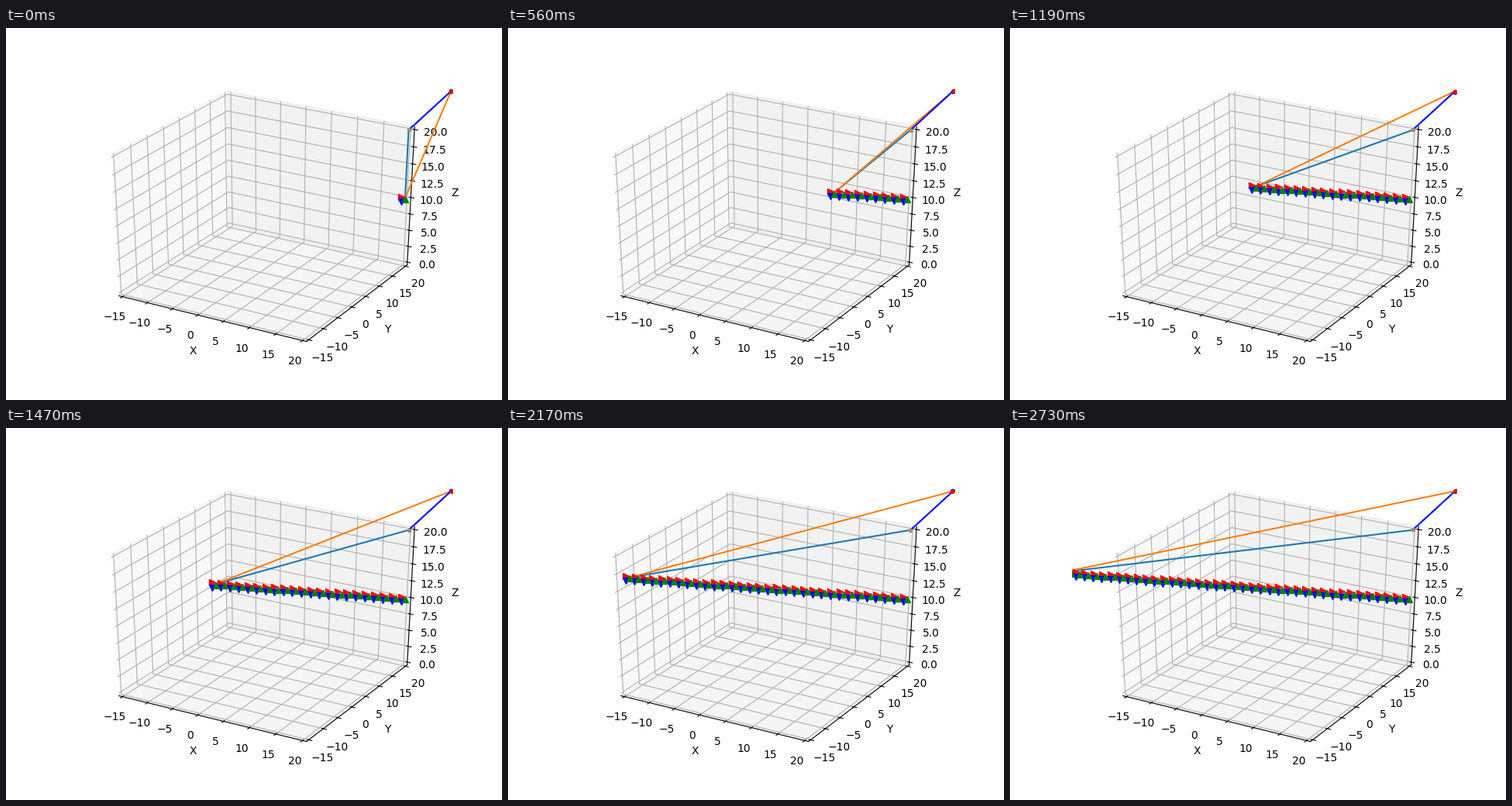
A matplotlib script that plays this animation: 640x480 px, repeating every 2800 ms.

```python
import numpy as np
import matplotlib.pyplot as plt
from matplotlib.animation import FuncAnimation

FRAMES = 40
START = np.array([20.0, 20.0, 10.0])
STEP = np.array([-1.5, -0.5, 0.0])
NEAR = np.array([20.0, 20.0, 20.0])
FAR = np.array([25.0, 25.0, 25.0])
PATH = START + np.arange(FRAMES)[:, None] * STEP

fig = plt.figure(figsize=(6.4, 4.8), dpi=100)
ax = fig.add_subplot(111, projection="3d")
ax.view_init(elev=30, azim=-60)

# A unit cube that fills the whole subplot instead of a centred square.
ax.set_box_aspect((1, 1, 1), zoom=np.sqrt(3) / 1.8294640721620434)
ax.apply_aspect = lambda position=None: None


def setup_axis(name, low, high, step):
    margin = (high - low) / 48
    ax.set(**{
        f"{name}lim": (low - margin, high + margin),
        f"{name}ticks": np.arange(low, high + step / 2, step),
        f"{name}label": name.upper(),
    })


setup_axis("x", -15, 20, 5)
setup_axis("y", -15, 20, 5)
setup_axis("z", 0, 20, 2.5)


def add_line(style, **kwargs):
    return ax.plot([], [], [], style, **kwargs)[0]


def set_points(line, points):
    line.set_data_3d(*np.atleast_2d(points).T)


near_ray = add_line("-", color="C0")
far_ray = add_line("-", color="C1")
link = add_line("b-")
set_points(link, [NEAR, FAR])

near_dot = add_line(".", color="#a08c78")
far_dots = [add_line(".", color=c) for c in ("green", "blue", "red")]
jitter = np.random.default_rng(4).normal(0, 0.06, (FRAMES, 4, 3))

# Trail markers and their offsets from the moving point.
trails = [
    (add_line("r>"), np.array([-0.75, 0.0, 0.1])),
    (add_line("bv"), np.array([-0.5, -0.5, -0.45])),
    (add_line("g^"), np.array([0.0, 0.0, -0.15])),
]


def update(i):
    set_points(near_ray, [NEAR, PATH[i]])
    set_points(far_ray, [FAR, PATH[i]])
    for line, offset in trails:
        set_points(line, PATH[:i + 1] + offset)
    set_points(near_dot, NEAR + jitter[i, 3])
    for dot, shift in zip(far_dots, jitter[i]):
        set_points(dot, FAR + shift)
    return []


anim = FuncAnimation(fig, update, frames=FRAMES, interval=70,
                     repeat=True, repeat_delay=0, blit=False)
plt.show()
```
